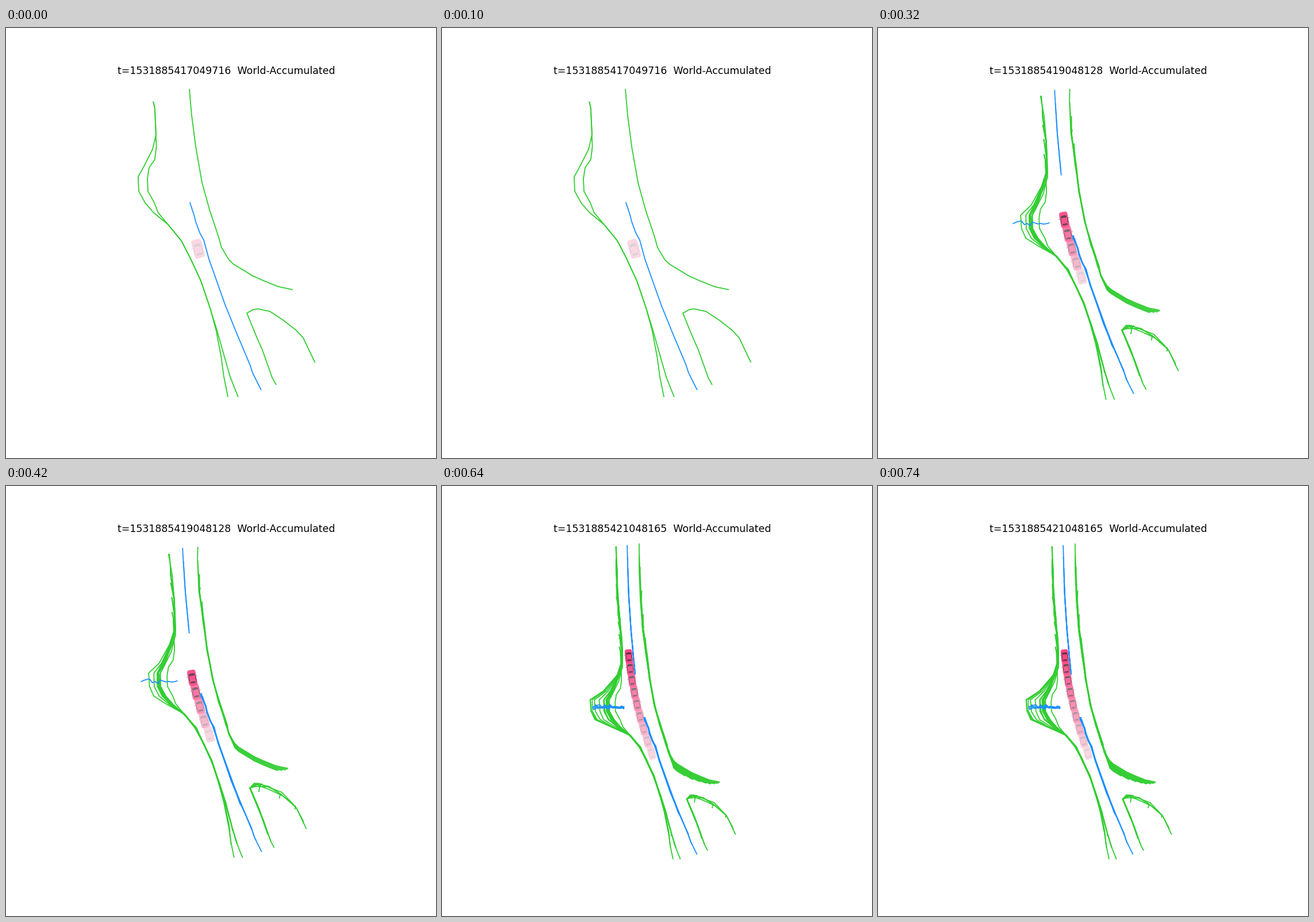
These frames come from a looping animation (748x748 px, 0.8 s). A matplotlib script:

```python
import numpy as np
import matplotlib.pyplot as plt
from matplotlib.animation import FuncAnimation

SIZE = 748
GREEN, BLUE = "limegreen", "dodgerblue"
BODY = np.array([252, 52, 120]) / 255
GLASS = np.array([72, 34, 52]) / 255
TRIM = np.array([120, 80, 100]) / 255

STAMPS = ["1531885417049716", "1531885418048938", "1531885419048128",
          "1531885420048532", "1531885421048165"]

# Each view maps world to screen: scale, x offset, y offset.
VIEWS = [(1, 0, 0), (.909, 37.7, 61), (.8317, 75.6, 112.6),
         (.7702, 105.5, 153.4), (.7186, 124.4, 187.9)]
SCANS = 2 * len(VIEWS) - 1

# Road layout in world units, as key points from top to bottom.
LEFT_TOP = [(249, -120), (250, -55), (252, 0), (256, 50), (261, 100), (263, 140)]
LEFT_LOW = [(282, 342), (305, 370), (320.5, 400), (339, 440), (355, 487),
            (367, 526), (380, 572), (390, 607), (403.5, 641)]
RIGHT = [(304, -121), (306, -55), (308, 15), (313, 85), (322, 150), (330, 207),
         (341, 269), (354, 316), (370, 364), (375, 382), (382, 398)]
BRANCH = [(382, 398), (396, 411), (429, 431), (449, 440), (474, 450), (498, 455)]
SIDE_LEG = [(419, 496), (437, 540), (446, 560), (463, 608), (469.5, 620)]
SIDE_ARC = [(419, 496), (430, 490), (438, 488.5), (459, 493), (482, 508),
            (505, 526), (517, 539), (537, 581)]
DIVIDER = [(320, 304), (327, 325), (330, 337), (337, 356), (344, 369), (353, 402),
           (381, 481), (400, 528), (424, 585), (429, 600), (443.5, 629)]
UPPER_DIVIDER = [(275, -117), (277, -50), (279, 5), (284.5, 86),
                 (291.5, 165), (294.5, 194)]

rng = np.random.default_rng(4)


def cut(t, v, start, end):
    """Part of the polyline v(t) between start and end."""
    inner = t[(t > start) & (t < end)]
    ts = np.concatenate([[start], inner, [end]])
    return ts, np.interp(ts, t, v)


def trace(knots, top, bottom, bend=0, noise=0):
    """What one scan sees of a road line; the far end may bend aside."""
    x, y = np.array(knots, float).T
    ys, xs = cut(y, x, top, min(bottom, y[-1]))
    xs += bend * np.exp((top - ys) / 30) + rng.normal(0, noise, len(xs))
    return np.column_stack([xs, ys])


def left_kerb(peak, late):
    """The left kerb, swinging out to x = peak at the lay-by."""
    bulge = [(262, 165 + late), (252 + late / 6, 195 + .8 * late),
             ((peak + 252) / 2, 235 + .2 * late), (peak, 256 + .15 * late),
             (peak + 1, 284), (peak + 12, 304), ((peak + 283) / 2, 321)]
    return LEFT_TOP + bulge + LEFT_LOW


def scan_lines(i):
    """All lines found by scan i, as (color, points)."""
    noise = .9 * min(i, 1)
    fade = .82 ** i
    low = 641 - 28 * i

    inner = 228 + 18 * .3 ** i + rng.normal(0, 4 * noise)
    outer = max(186, 230 - 1.25 * i * i) + rng.normal(0, 2 * noise)
    for peak, late, spread in (inner, 42, 0), (outer, 20, 18.5):
        pts = trace(left_kerb(peak, late * .3 ** i), 129 - 30.4 * i, low,
                    -6 * fade, noise)
        pts[:, 0] -= spread * (np.clip(pts[:, 1] - 480, 0, None) / 165) ** 2
        yield GREEN, pts

    kerb = trace(RIGHT, 107 - 28.5 * i, 398, 3 * fade, noise)
    bx, by = np.array(BRANCH).T
    xs, ys = cut(bx, by, 388, 498 - 1.3 * i * i)
    yield GREEN, np.vstack([kerb[:-1], np.column_stack([xs, ys + 2.2 * i])])

    if i < 5:
        leg = trace(SIDE_LEG, 496, 620 - 14 * i, 0, noise)
        ax_, ay = np.array(SIDE_ARC).T
        arc = np.column_stack(cut(ax_, ay, 419, 537 - 6 * i * i))
        arc += rng.normal(0, 3 * noise, arc.shape)
        hook = arc[-1] + (-.5 * i, 3 * i)
        yield GREEN, np.vstack([leg[::-1], arc[1:], hook])

    yield BLUE, trace(DIVIDER, 304 - 5 * noise, 629 - 24 * i, -2 * noise, noise)
    if i >= 3:
        yield BLUE, trace(UPPER_DIVIDER, 107 - 28 * i, 144 + 7 * i, 0, .4)
    if i >= 4:
        xs = np.linspace(198 + rng.normal(0, 4), 267, 14)
        yield BLUE, np.column_stack([xs, 274 + rng.normal(0, 2.2, 14)])


scans = [list(scan_lines(i)) for i in range(SCANS)]


def to_screen(view, pts):
    scale, dx, dy = VIEWS[view]
    return pts * scale + (dx, dy)


def mirror(half):
    """Close a right-hand outline with its reflection."""
    half = np.array(half, float)
    return np.vstack([half, half[::-1] * FLIP])


FLIP = np.array([-1, 1])
HULL = mirror([(5, -16.5), (7.5, -15.5), (8.8, -12), (9, -6), (8.6, 0),
               (9, 8), (9, 12), (8, 15.5), (6, 16.5)])
FRONT = mirror([(3.5, -9), (7, -7), (5, -3.5), (2, -4.3)])
REAR = mirror([(4.5, 8), (6.3, 11), (3, 11.6)])
DOOR = np.array([(7.7, -5), (6.2, -1.5), (6.2, 5.5), (7.7, 9)])
WING = np.array([(8.8, -4), (11.5, -2.6), (11.5, -1.8), (8.8, -2.6)])
PARTS = [(WING, TRIM), (WING * FLIP, TRIM), (HULL, BODY), (FRONT, GLASS),
         (REAR, GLASS), (DOOR, GLASS), (DOOR * FLIP, GLASS)]


def draw_car(view, i, alpha):
    center = (334 - 10.8 * i + .49 * i * i, 384 - 30 * i + .1 * i * i)
    a = np.radians(15 - 1.2 * i)
    turn = np.array([(np.cos(a), np.sin(a)), (-np.sin(a), np.cos(a))])
    for shape, color in PARTS:
        pts = to_screen(view, shape @ turn.T + center)
        ax.fill(*pts.T, color=1 - alpha * (1 - color), lw=0, zorder=1)


fig = plt.figure(figsize=(SIZE / 100, SIZE / 100), dpi=100, facecolor="white")
ax = fig.add_axes([0, 0, 1, 1])


def draw(view):
    ax.clear()
    ax.set(xlim=(0, SIZE), ylim=(SIZE, 0))
    ax.axis("off")
    count = 2 * view + 1
    for i in range(count):
        draw_car(view, i, .2 + .8 * i / count)
        for color, pts in scans[i]:
            ax.plot(*to_screen(view, pts).T, color=color, lw=1.3,
                    solid_capstyle="projecting", zorder=3 if color == BLUE else 2)
    ax.text(383.2, 79.7, f"t={STAMPS[view]}  World-Accumulated", fontsize=12.5,
            family="DejaVu Sans", ha="center", va="baseline", color="black")
    return []


anim = FuncAnimation(fig, draw, frames=len(VIEWS), init_func=lambda: draw(0),
                     interval=160, repeat=True, repeat_delay=0)
plt.show()
```
